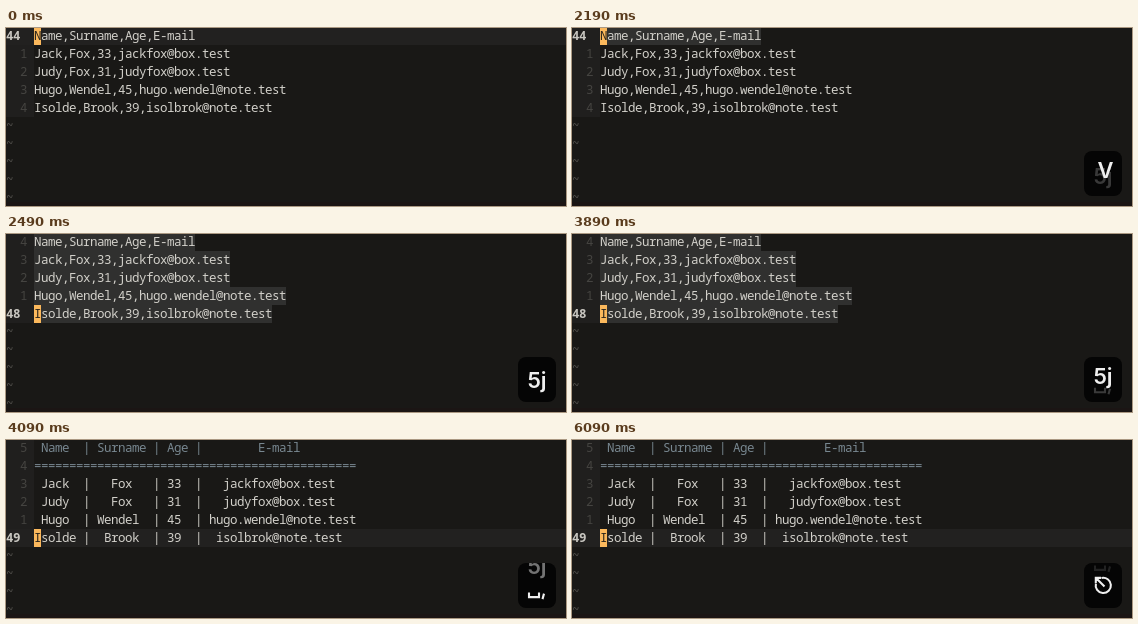
An HTML page for the animation above (8 s loop, 560x178 px).

```html
<!DOCTYPE html>
<html lang="en">
<head>
<meta charset="utf-8">
<title>Aligning CSV text in an editor</title>
<style>
html, body { margin: 0; width: 100%; height: 100%; overflow: hidden; background: #191816; }
#stage { position: relative; width: 560px; height: 178px; overflow: hidden; }
.screen { position: absolute; inset: 0; font: 12.5px/18px "Noto Sans Mono", monospace; letter-spacing: -.5px; color: #d2d0ca; }
.row { position: absolute; left: 0; width: 560px; height: 18px; white-space: pre; }
.num, .text { position: absolute; top: 0; height: 18px; }
.num { left: 0; width: 28px; background: #201f1e; color: #454441; }
.text { left: 28px; }
.current .num { color: #c8c6c0; font-weight: 600; }
.line, .line .num { background: #222120; }
.selected .text { background: #30302f; }
.cursor { position: absolute; left: 0; top: 0; width: 7px; height: 18px; background: #fbb85c; color: #2a241b; }
.head { color: #788790; }
.tilde { color: #575551; }
#status { position: absolute; top: 174px; width: 560px; height: 4px; background: #1b1514; }
#badge { position: absolute; right: 10px; top: 123px; height: 45px; border-radius: 8px; background: #050505; overflow: hidden; }
.key { position: absolute; top: 0; right: 0; width: 38px; height: 45px; color: #efefef; font: 600 22px/46px Inter, sans-serif; text-align: center; }
.key svg { position: absolute; left: 0; top: 0; fill: none; stroke: currentColor; stroke-width: 2.1; }
</style>
</head>
<body>
<div id="stage">
  <div id="status"></div>
  <div id="badge">
    <div class="key" style="width:33px">V</div>
    <div class="key">5j</div>
    <div class="key"><svg width="38" height="44"><path d="M11 29v4.5h10V29M26 30l-1.5 5.5"/></svg></div>
    <div class="key"><svg width="38" height="44"><path d="M17.5 14.9A7.6 7.6 0 1 1 11.9 20.5M20.5 23.5L12 15M11.8 20V14.8H17"/></svg></div>
  </div>
</div>
<script>
const LOOP = 8000;
const people = [
  ["Name", "Surname", "Age", "E-mail"],
  ["Jack", "Fox", "33", "jackfox@box.test"],
  ["Judy", "Fox", "31", "judyfox@box.test"],
  ["Hugo", "Wendel", "45", "hugo.wendel@note.test"],
  ["Isolde", "Brook", "39", "isolbrok@note.test"]
];
const widths = [6, 7, 3, 21];
const center = (s, w) => (" ".repeat((w - s.length) >> 1) + s).padEnd(w);
const csv = people.map(p => p.join(","));
const table = people.map(p => p.map((s, i) => center(s, widths[i])).join(" | "));
table.splice(1, 0, "=".repeat(46));

const stage = document.getElementById("stage");
const badge = document.getElementById("badge");
const keys = [...badge.children];

function add(parent, className, text = "") {
  const el = document.createElement("div");
  el.className = className;
  el.textContent = text;
  parent.append(el);
  return el;
}

function makeScreen(lines, current, lineNumber, visual, headRows = 0) {
  const screen = add(stage, "screen");
  for (let i = 0; i < 10; i++) {
    const row = add(screen, "row");
    row.style.top = i * 18 - 1 + "px";
    if (i >= lines.length) {
      row.classList.add("tilde");
      row.textContent = "~";
      continue;
    }
    const here = i === current;
    if (here) row.classList.add("current");
    if (here && !visual) row.classList.add("line");
    if (visual && i <= current) row.classList.add("selected");
    if (i < headRows) row.classList.add("head");
    add(row, "num", here ? lineNumber : String(Math.abs(i - current)).padStart(3));
    const text = add(row, "text", lines[i]);
    if (here) add(text, "cursor", lines[i][0]);
  }
  return screen;
}

const screens = [
  { at: 0, el: makeScreen(csv, 0, "44", false) },
  { at: 600, el: makeScreen(csv, 0, "44", true) },
  { at: 2390, el: makeScreen(csv, 4, "48", true) },
  { at: 4090, el: makeScreen(table, 5, "49", false, 2) }
];
stage.append(badge);

// Each key rolls in through 100 ms steps of progress.
const rolls = [
  { at: 500, steps: [.15, .45, 1] },
  { at: 2190, steps: [.15, .36, .7, 1] },
  { at: 3890, steps: [.15, .36, .7, 1] },
  { at: 5890, steps: [.36, .7, .95] }
];

function place(el, y, opacity) {
  el.style.transform = `translateY(${y}px)`;
  el.style.opacity = Math.max(0, Math.min(1, opacity));
}

function render(t) {
  const shown = screens.findLastIndex(s => t >= s.at);
  screens.forEach((s, i) => s.el.style.visibility = i === shown ? "visible" : "hidden");

  const active = rolls.findLastIndex(r => t >= r.at);
  keys.forEach(k => place(k, 0, 0));
  badge.style.opacity = active < 0 ? 0 : 1;
  if (active < 0) return;
  badge.style.width = active ? "38px" : "33px";
  const { at, steps } = rolls[active];
  const step = Math.min(steps.length - 1, Math.floor((t - at) / 100));
  const p = steps[step];
  if (active === 0) badge.style.opacity = Math.min(1, p * 1.5);
  place(keys[active], active ? 2 * (1 - p) : 0, p * 1.5);
  if (active && p < 1) place(keys[active - 1], -28 * p, (1.04 - p) * 1.4);
}

const start = performance.now();
function tick() {
  render((performance.now() - start) % LOOP);
  requestAnimationFrame(tick);
}
tick();
</script>
</body>
</html>
```
